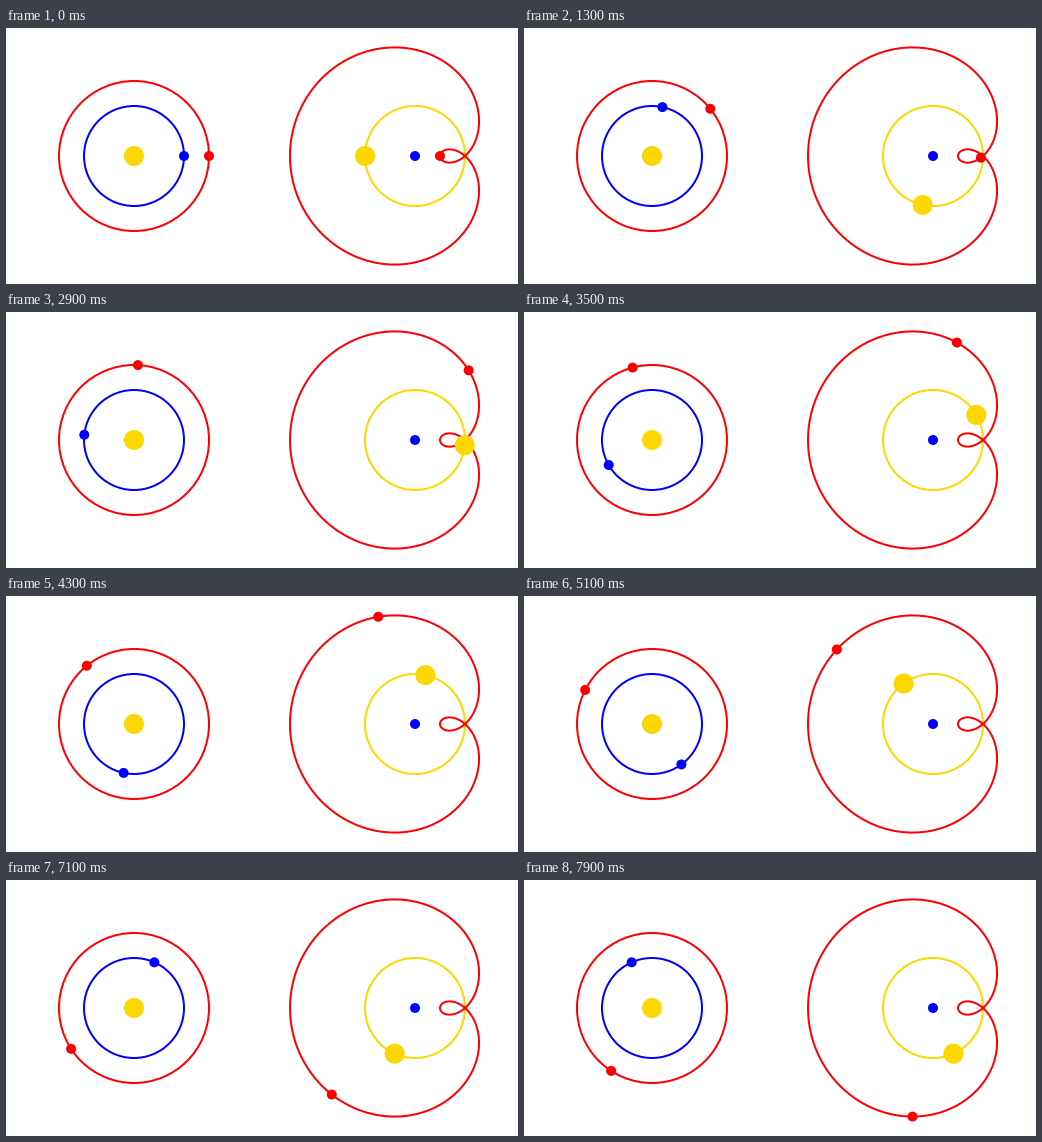
Animation, 512 px wide and 256 px high, one loop 8 s. Source, as a matplotlib script:

```python
import matplotlib.pyplot as plt
import numpy as np
from matplotlib.animation import FuncAnimation
from matplotlib.patches import Circle

W, H, DPI = 512, 256, 100
FRAMES, INTERVAL = 80, 100
INNER_R, OUTER_R = 50, 75
INNER_STEP = 6  # degrees per frame; the outer planet moves at half the rate
HELIO, GEO = np.array([128, 128]), np.array([409, 128])
GOLD, BLUE, RED = "#ffd700", "#0000ff", "#ff0000"
LINE = 2 * 72 / DPI

fig = plt.figure(figsize=(W / DPI, H / DPI), dpi=DPI, facecolor="white")
ax = fig.add_axes([0, 0, 1, 1])
ax.set_xlim(0, W)
ax.set_ylim(H, 0)
ax.axis("off")


def polar(radius, angle):
    return np.array([radius * np.cos(angle), -radius * np.sin(angle)])


def ring(center, radius, color):
    ax.add_patch(Circle(center, radius, fill=False, ec=color, lw=LINE, zorder=1))


def body(center, radius, color):
    return ax.add_patch(Circle(center, radius, fc=color, lw=0, zorder=3))


def positions(angle):
    """Offsets of the inner and outer planets from the sun."""
    return polar(INNER_R, angle), polar(OUTER_R, angle / 2)


ring(HELIO, INNER_R, BLUE)
ring(HELIO, OUTER_R, RED)
ring(GEO, INNER_R, GOLD)

# Path of the outer planet seen from the inner one
inner, outer = positions(np.linspace(0, 4 * np.pi, 1500))
ax.plot(*(GEO[:, None] + outer - inner), color=RED, lw=LINE, zorder=2)

body(HELIO, 10, GOLD)
body(GEO, 5, BLUE)
helio_inner = body(HELIO, 5, BLUE)
helio_outer = body(HELIO, 5, RED)
geo_sun = body(GEO, 10, GOLD)
geo_outer = body(GEO, 5, RED)


def update(i):
    inner, outer = positions(np.radians(INNER_STEP * i))
    helio_inner.center = HELIO + inner
    helio_outer.center = HELIO + outer
    geo_sun.center = GEO - inner
    geo_outer.center = GEO - inner + outer
    return helio_inner, helio_outer, geo_sun, geo_outer


anim = FuncAnimation(fig, update, frames=FRAMES, interval=INTERVAL,
                     repeat=True, repeat_delay=0, blit=False)
plt.show()
```
